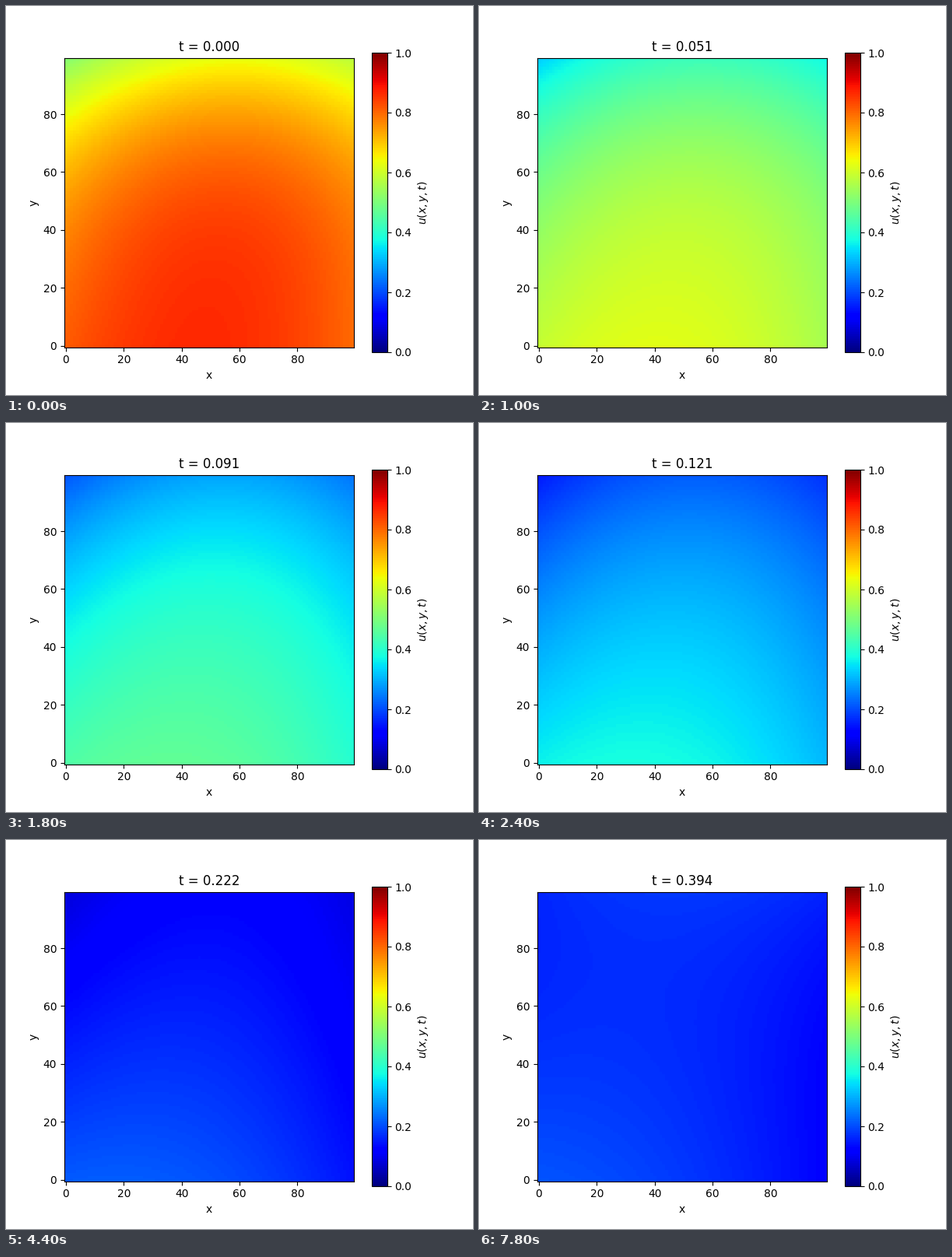
A matplotlib script that plays this animation: 600 px wide and 500 px high, repeating every 8 s.

```python
import numpy as np
import matplotlib.pyplot as plt
from matplotlib.animation import FuncAnimation

SIZE = 100
FRAMES = 40
STEP = 1 / 99

# s runs from -1 to 1 across, y from 0 to 1 upwards
s, y = np.meshgrid(np.linspace(-1, 1, SIZE), np.linspace(0, 1, SIZE))


def decay(n, rate):
    return np.exp(-n / rate)


def swell(n, peak, power):
    """Rise from 0 to 1 at the peak, then fade away."""
    z = n / peak
    return (z * np.exp(1 - z)) ** power


def field(n):
    # Middle column: falling level, slope and top droop
    level = 0.866 * np.exp(-(n / 13.58) ** 1.095) + 9.5e-5 * n**2
    slope = 0.015 + 0.09 * swell(n, 13, 1.5)
    droop = 0.268 * decay(n, 12.5) - 0.05
    middle = level - slope * y - droop * y**3

    # Sideways: a ridge that flattens and drifts to the left
    tilt = 0.036 * decay(n, 14) - 0.044 + 0.04 * y
    curve = 0.062 * decay(n, 27) * (1 + 0.4 * y)
    return middle + tilt * s - curve * s**2


fig, ax = plt.subplots(figsize=(6, 5), dpi=100)
image = ax.imshow(field(0), cmap="jet", origin="lower", vmin=0, vmax=1)
fig.colorbar(image, ax=ax, label="$u(x,y,t)$")
ax.set_xlabel("x")
ax.set_ylabel("y")
title = ax.set_title("t = 0.000")


def update(n):
    image.set_data(field(n))
    title.set_text(f"t = {n * STEP:.3f}")
    return image, title


anim = FuncAnimation(fig, update, frames=FRAMES, interval=200, repeat=True)
plt.show()
```
